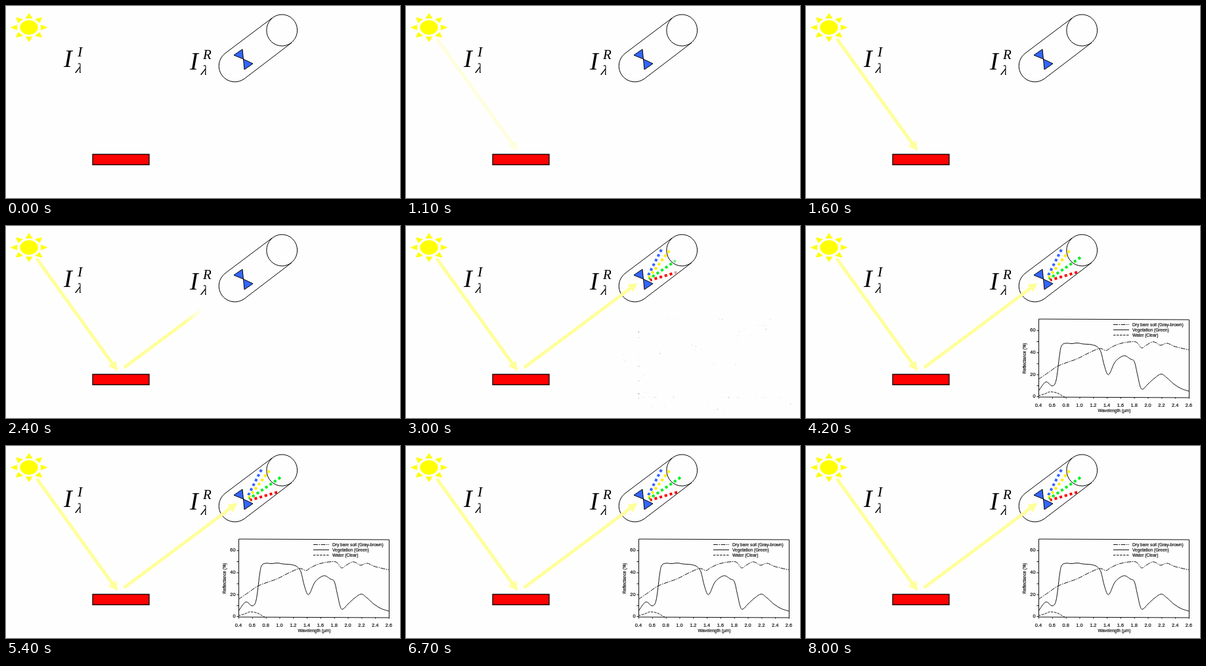
Animation of 600 by 293 pixels, one loop 8100 ms. Source, as an HTML page:

```html
<!DOCTYPE html>
<html lang="en">
<head>
<meta charset="utf-8">
<title>Reflectance</title>
<style>
  html, body { margin: 0; width: 100%; height: 100%; overflow: hidden; background: #fefefe; }
  svg { display: block; width: 100vw; height: 100vh; }
  .symbol { font-family: "Liberation Serif", serif; font-style: italic; }
  .outline { fill: none; stroke: #000; }
  #chart { font: 6.6px "Liberation Sans", sans-serif; fill: #111; }
  #chart text { stroke: #111; stroke-width: .2px; }
  #chart path { fill: none; stroke: #111; }
</style>
</head>
<body>
<svg viewBox="0 0 600 293">
  <defs>
    <linearGradient id="beamFade" gradientUnits="userSpaceOnUse">
      <stop stop-color="#fff"/><stop offset="1" stop-color="#000"/>
    </linearGradient>
    <linearGradient id="raysFade" gradientUnits="userSpaceOnUse">
      <stop stop-color="#fff"/><stop offset="1" stop-color="#000"/>
    </linearGradient>
    <mask id="beamMask" maskUnits="userSpaceOnUse" x="0" y="0" width="600" height="293">
      <rect width="600" height="293" fill="url(#beamFade)"/>
    </mask>
    <mask id="raysMask" maskUnits="userSpaceOnUse" x="0" y="0" width="600" height="293">
      <rect width="600" height="293" fill="url(#raysFade)"/>
    </mask>
    <filter id="dissolve" filterUnits="userSpaceOnUse" x="300" y="130" width="300" height="163"
            color-interpolation-filters="sRGB">
      <feTurbulence type="fractalNoise" baseFrequency=".7" seed="4"/>
      <feColorMatrix values="0 0 0 0 0  0 0 0 0 0  0 0 0 0 0  1 0 0 0 0"/>
      <feComponentTransfer result="grain"><feFuncA id="grainAlpha" type="linear" slope="6"/></feComponentTransfer>
      <feComposite in="SourceGraphic" in2="grain" operator="in"/>
    </filter>
  </defs>

  <g id="sun" fill="#ff0"><ellipse cx="35" cy="32.8" rx="13.7" ry="11"/></g>

  <g class="symbol">
    <text x="88" y="93" font-size="38">I</text>
    <text x="109" y="77" font-size="22">I</text>
    <text transform="translate(105.5 101.5) skewX(-10)" font-size="21">λ</text>
    <text x="280" y="97" font-size="38">I</text>
    <text x="300" y="81" font-size="21">R</text>
    <text transform="translate(296.5 105) skewX(-10)" font-size="21">λ</text>
  </g>

  <rect x="132" y="226.3" width="86" height="16" fill="#f00" stroke="#000" stroke-width="1.3"/>

  <g class="outline">
    <path d="M405 18.5L334 72A24 24 0 0 0 363 111L435 56"/>
    <ellipse cx="420.2" cy="37" rx="23.4" ry="24"/>
  </g>

  <g id="incoming" stroke="#ff9" fill="#ff9"></g>
  <g mask="url(#beamMask)"><g id="reflected" stroke="#ff9" fill="#ff9"></g></g>

  <path d="M347 75L360 66L361.5 81L376 88L363 97L361.5 81Z" fill="#36f" stroke="#000"/>

  <g mask="url(#raysMask)" stroke-width="4" stroke-dasharray="4 4">
    <path d="M389 36L368 77" stroke="#36f"/>
    <path d="M401 37.5L368 81" stroke="#ffee10"/>
    <path d="M418 48L370 81" stroke="#0e2"/>
    <path d="M413 70.5L372 82.5" stroke="#f00"/>
  </g>

  <g id="chart"></g>
</svg>

<script>
const LOOP = 8100, STEP = 100;
const NS = 'http://www.w3.org/2000/svg';
const $ = id => document.getElementById(id);
const clamp = v => Math.max(0, Math.min(1, v));

function add(parent, tag, attrs, text) {
  const el = document.createElementNS(NS, tag);
  for (const key in attrs) el.setAttribute(key, attrs[key]);
  if (text !== undefined) el.textContent = text;
  return parent.appendChild(el);
}

function drawSun() {
  for (let i = 0; i < 8; i++) {
    const a = i * Math.PI / 4, c = Math.cos(a), s = Math.sin(a);
    const points = [[1, 0], [.63, .19], [.63, -.19]].map(([u, v]) =>
      [35 + 28.5 * (u * c - v * s), 32.8 + 22 * (u * s + v * c)]);
    add($('sun'), 'polygon', { points: points.join(' ') });
  }
}

function drawArrow(group, x1, y1, x2, y2) {
  const length = Math.hypot(x2 - x1, y2 - y1);
  const angle = Math.atan2(y2 - y1, x2 - x1) * 180 / Math.PI;
  group.setAttribute('transform', `translate(${x1} ${y1}) rotate(${angle})`);
  add(group, 'path', { d: `M0 0H${length - 12}`, 'stroke-width': 4.8 });
  add(group, 'path', { d: `M${length} 0l-14 -7.2v14.4z`, stroke: 'none' });
}

// Catmull-Rom spline through a flat list of x, y pairs
function smooth(flat) {
  const p = [];
  for (let i = 0; i < flat.length; i += 2) p.push([flat[i], flat[i + 1]]);
  let d = 'M' + p[0];
  for (let i = 0; i < p.length - 1; i++) {
    const a = p[i - 1] || p[i], b = p[i], c = p[i + 1], e = p[i + 2] || c;
    const ctrl = (q, from, to, sign) => q.map((v, k) => v + sign * (to[k] - from[k]) / 6);
    d += `C${ctrl(b, a, c, 1)} ${ctrl(c, b, e, -1)} ${c}`;
  }
  return d;
}

const SOIL = [354,234, 370,223, 385,213, 412,203, 430,194, 447,187, 457,190, 465,185, 480,179,
  497,176.5, 504,178, 511,186, 518,182, 527,177, 533,178, 540,182, 550,179, 562,184, 583,189];
const PLANTS = [354,252, 365,238, 375,244, 381,235, 386,198, 389,183, 395,179, 405,179.5,
  413,178.5, 422,180, 434,181, 443,184, 449,192, 454,212, 459,226, 463,224, 471,207, 484,198,
  494,203, 500,207, 505,228, 509,245, 513,249, 521,241, 531,232, 541,226, 550,232, 560,241,
  571,248, 583,252];
const WATER = [354,259, 364,256, 372,253, 383,255, 390,259, 394,261];

function drawChart() {
  const chart = $('chart');
  const label = (x, y, text, anchor, extra) =>
    add(chart, 'text', { x, y, 'text-anchor': anchor, ...extra }, text);
  const tickFont = { 'font-size': 7.4 };

  add(chart, 'path', { d: 'M354.5 142L583.5 143V262L354.5 261Z' });
  for (let i = 0; i < 12; i++) {
    const x = 354.5 + i * 229 / 11;
    add(chart, 'path', { d: `M${x} 261.5v2` });
    label(x - .5, 276, (.4 + i * .2).toFixed(1), 'middle', tickFont);
  }
  for (let i = 0; i < 7; i++) {
    const y = 260.5 - i * 16.8;
    add(chart, 'path', { d: `M354.5 ${y}h-3` });
    if (i % 2 === 0) label(349.5, y + 1.7, i * 10, 'end', tickFont);
  }
  label(469.5, 284, 'Wavelength (µm)', 'middle');
  label(0, 0, 'Reflectance (%)', 'middle', { transform: 'translate(335.3 202) rotate(-90)' });

  [
    ['Dry bare soil (Gray-brown)', SOIL, '7 1.5 1.5 1.5', 150.5],
    ['Vegetation (Green)', PLANTS, 'none', 158.5],
    ['Water (Clear)', WATER, '3.5 1.5', 166.5]
  ].forEach(([name, points, dash, y]) => {
    add(chart, 'path', { d: smooth(points), 'stroke-dasharray': dash });
    add(chart, 'path', { d: `M468 ${y}H492`, 'stroke-dasharray': dash });
    label(497, y + 2.5, name, 'start');
  });
}

function setWipe(gradient, edge, softness) {
  gradient.setAttribute('x1', edge - softness);
  gradient.setAttribute('x2', edge);
}

function render(t) {
  $('incoming').style.opacity = clamp((t - 700) / 700) ** 2;
  setWipe($('beamFade'), 172 + (t - 2000) * .32, 26);
  setWipe($('raysFade'), 364 + (t - 2600) * .125, 8);

  // the chart appears grain by grain
  const p = clamp((t - 2950) / 850), chart = $('chart');
  chart.style.visibility = p > 0 ? 'visible' : 'hidden';
  $('grainAlpha').setAttribute('intercept', -6 * (.72 - .6 * p));
  if (p < 1) chart.setAttribute('filter', 'url(#dissolve)');
  else chart.removeAttribute('filter');
}

drawSun();
drawArrow($('incoming'), 47, 50, 170, 221);
drawArrow($('reflected'), 180, 216, 352.5, 87);
drawChart();

const start = performance.now();
let shown = -1;
function tick() {
  const t = Math.floor((performance.now() - start) % LOOP / STEP) * STEP;
  if (t !== shown) render(shown = t);
  requestAnimationFrame(tick);
}
tick();
</script>
</body>
</html>
```
